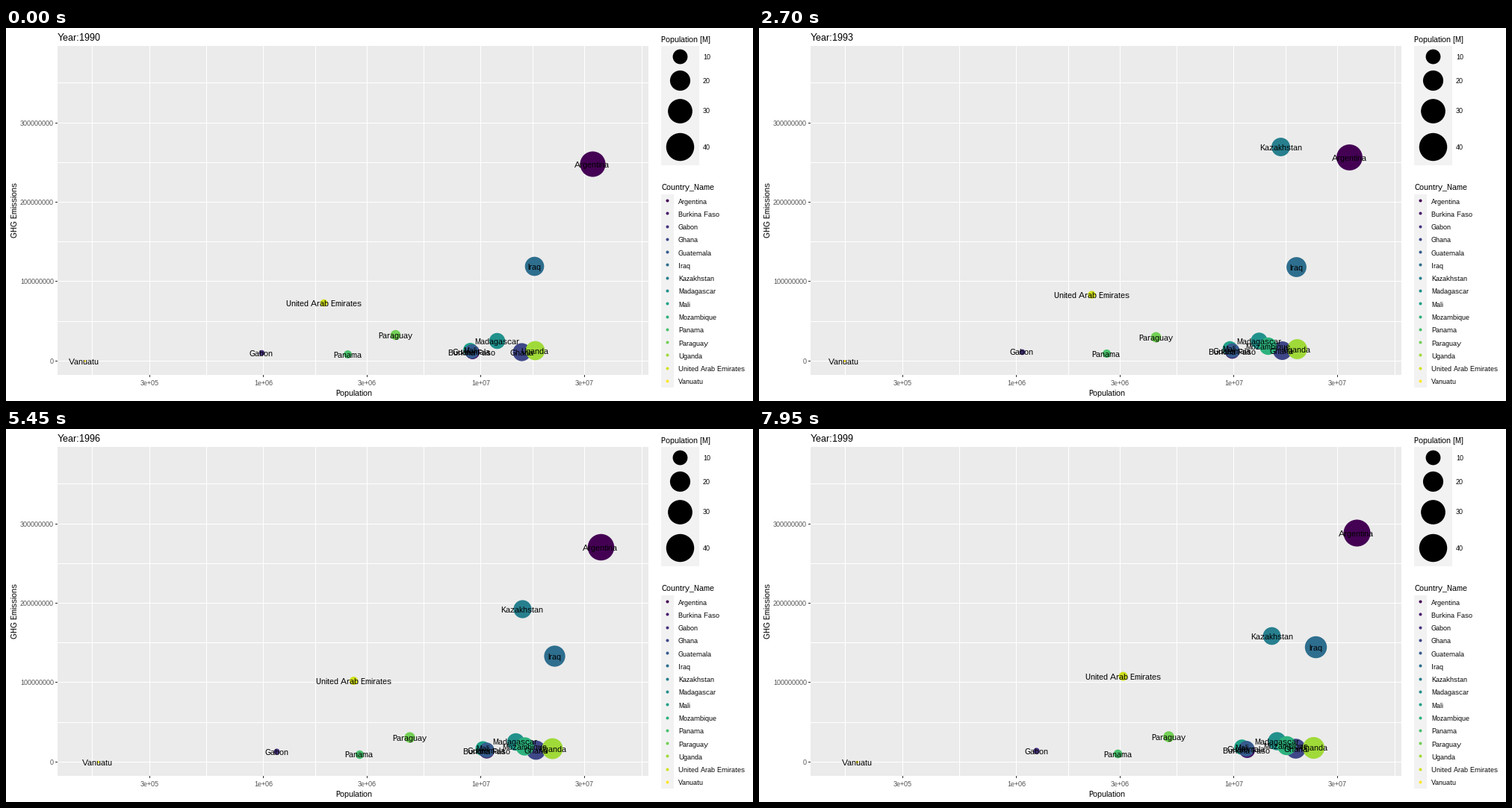
A matplotlib script for the animation above (8 s loop, 1000x500 px).

```python
import numpy as np
import matplotlib.pyplot as plt
from matplotlib.animation import FuncAnimation
from matplotlib.patches import Rectangle

plt.rcParams.update({
    "font.family": "Liberation Sans",
    "text.hinting": "native",          # whole-pixel glyph widths
    "text.hinting_factor": 1,
})

W, H, DPI = 1000, 500, 100
PT = 72 / DPI                          # points per pixel
FRAMES, INTERVAL = 160, 50
FRAMES_PER_YEAR = 499 / 28
START, END = 1990, 1998.92

LEGEND_ORDER = ["Argentina", "Burkina Faso", "Gabon", "Ghana", "Guatemala",
                "Iraq", "Kazakhstan", "Madagascar", "Mali", "Mozambique",
                "Panama", "Paraguay", "Uganda", "United Arab Emirates",
                "Vanuatu"]


def steady(pop, pop_end, mt, mt_end, start=START):
    return [(start, pop, mt), (END, pop_end, mt_end)]


# Key points (year, population in millions, emissions in Mt), back to front.
DATA = {
    "Argentina": [(START, 32.8, 248), (1994.7, 35.1, 262), (END, 36.9, 289)],
    "Iraq": [(START, 17.7, 120), (1991, 17.9, 62), (1993, 19.4, 118),
             (1994.7, 21, 131.5), (1996.1, 21.9, 133), (1997.3, 22.6, 160),
             (END, 23.9, 145)],
    "Kazakhstan": [(1991, 16.5, 308), (1993, 16.5, 271), (1996.1, 15.6, 193),
                   (1997.3, 15.4, 173), (END, 15, 159)],
    "United Arab Emirates": [(START, 1.9, 73.4), (1991.1, 2.02, 81),
                             (1993, 2.22, 84), (1996.1, 2.6, 102.4),
                             (END, 3.1, 108.5)],
    "Paraguay": [(START, 4.05, 32.8), (1991, 4.18, 29.5), (END, 5.02, 32.3)],
    "Panama": steady(2.44, 2.93, 8.8, 10.7),
    "Gabon": steady(0.98, 1.24, 10.6, 14.7),
    "Vanuatu": steady(0.15, 0.185, 0.1, 0.1),
    "Madagascar": steady(11.9, 15.8, 25.4, 26.4),
    "Mali": steady(8.97, 10.9, 14.6, 19),
    "Burkina Faso": steady(9.13, 11.5, 11.6, 15),
    "Guatemala": steady(9.08, 11.4, 12.1, 17),
    "Ghana": steady(15.5, 19.3, 11.9, 16.9),
    "Mozambique": steady(13.5, 17.5, 19, 20.6, start=1991),
    "Uganda": steady(17.8, 23.4, 13.8, 18.6),
}


def to_x(millions):
    return 344.3 + 290.7 * np.log10(millions)


def to_y(mt):
    return 446.3 - 1.064 * mt


def diameter(millions):
    return 2.4 + 5.55 * np.sqrt(np.maximum(millions - 0.147, 0))


fig = plt.figure(figsize=(W / DPI, H / DPI), dpi=DPI, facecolor="white")
ax = fig.add_axes([0, 0, 1, 1])
ax.set_xlim(0, W)
ax.set_ylim(H, 0)
ax.axis("off")


def rect(x, y, w, h, color):
    ax.add_patch(Rectangle((x, y), w, h, facecolor=color, linewidth=0,
                           antialiased=False, zorder=1))


def label(x, baseline, text, size, color="black", **kw):
    return ax.text(x, baseline, text, fontsize=size * PT, color=color,
                   va="baseline", zorder=5, **kw)


def dots(xs, ys, diams, colors, zorder=3):
    return ax.scatter(xs, ys, s=(np.asarray(diams) * PT) ** 2, c=colors,
                      linewidths=0, antialiased=False, zorder=zorder)


# Panel, grid and axes
rect(69, 24, 791, 441, "#EBEBEB")
for x in (115, 192, 268, 344, 414, 483, 559, 635, 705, 774, 851):
    rect(x, 24, 1, 441, "white")
for mt in range(0, 351, 50):
    rect(69, int(to_y(mt)), 791, 1, "white")

for millions, text in ((0.3, "3e+05"), (1, "1e+06"), (3, "3e+06"),
                       (10, "1e+07"), (30, "3e+07")):
    x = round(to_x(millions))
    rect(x, 465, 1, 3, "#333333")
    label(x + 0.5, 479, text, 9, "#4D4D4D", ha="center")
for mt in range(0, 301, 100):
    y = int(to_y(mt))
    rect(66, y, 3, 1, "#333333")
    label(64, y + 4, str(mt * 10 ** 6), 9, "#4D4D4D", ha="right")

label(465.5, 493, "Population", 11, ha="center")
label(15, 244, "GHG Emissions", 11, ha="center", rotation=90,
      rotation_mode="anchor")
title = label(69, 17, "", 13)

# Size legend
label(877, 19, "Population [M]", 11)
rect(877, 24, 51, 160, "#F2F2F2")
for y, millions in zip((38, 70, 110.5, 159), (10, 20, 30, 40)):
    dots([902], [y], [diameter(millions)], ["black"])
    label(933, round(y + 4), str(millions), 9)

# Colour legend
viridis = plt.get_cmap("viridis")
COLORS = {name: viridis(i / 14) for i, name in enumerate(LEGEND_ORDER)}
label(877, 217, "Country_Name", 11)
rect(877, 223, 17, 259, "#F2F2F2")
for i, name in enumerate(LEGEND_ORDER):
    y = 231.5 + 17.28 * i
    dots([885], [y - 0.5], [4], [COLORS[name]])
    label(900, round(y + 4), name, 9)


class Bubble:
    """A country's dot and name, gliding between its key points."""

    def __init__(self, name, keys):
        self.years, pops, mts = np.array(keys, float).T
        self.xs, self.ys = to_x(pops), to_y(mts)
        self.dot = dots([0], [0], [1], [COLORS[name]], zorder=4)
        self.tag = label(0, 0, name, 11, ha="center")

    def move(self, year):
        x = np.interp(year, self.years, self.xs)
        y = np.interp(year, self.years, self.ys)
        millions = 10 ** ((x - to_x(1)) / (to_x(10) - to_x(1)))
        self.dot.set_offsets([(x, y)])
        self.dot.set_sizes([(diameter(millions) * PT) ** 2])
        self.tag.set_position((x, y + 4.9))
        for artist in (self.dot, self.tag):
            artist.set_visible(bool(year >= self.years[0]))


bubbles = [Bubble(name, keys) for name, keys in DATA.items()]


def draw(frame):
    year = START + frame / FRAMES_PER_YEAR
    title.set_text(f"Year:{round(year)}")
    for bubble in bubbles:
        bubble.move(year)
    return [title]


anim = FuncAnimation(fig, draw, frames=FRAMES, interval=INTERVAL,
                     init_func=lambda: draw(0), repeat=True, repeat_delay=0,
                     blit=False)
plt.show()
```
